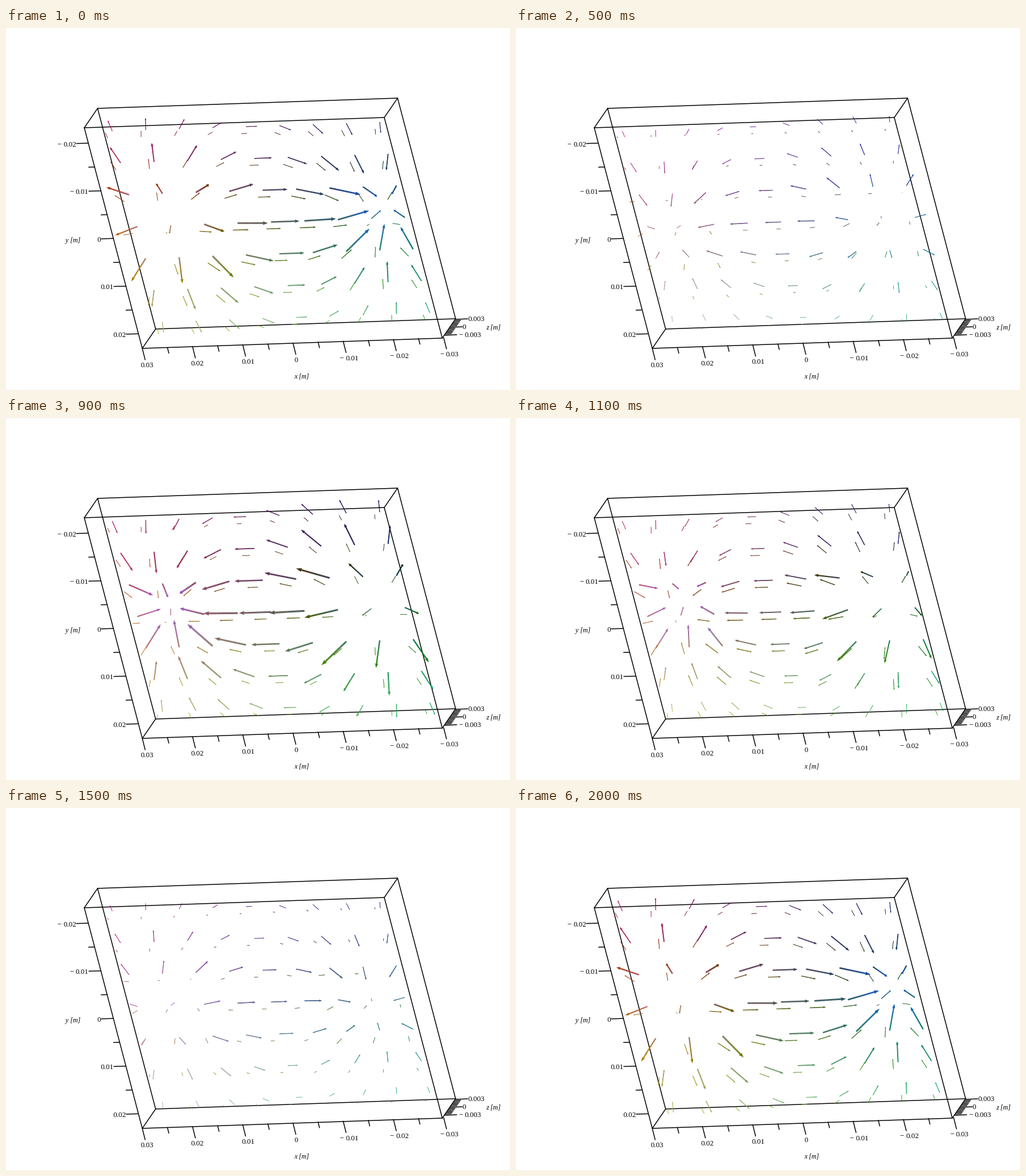
These frames come from a looping animation (882x635 px, 2.1 s). A matplotlib script:

```python
import numpy as np
import matplotlib.pyplot as plt
from matplotlib.animation import FuncAnimation
from matplotlib.collections import LineCollection, PolyCollection

W, H, DPI = 882, 635, 100
PX = 72 / DPI
STEPS = 20

# Screen directions of the three space axes
AXES = np.array([[1, -0.034], [0.25, 0.953], [-0.37, 0.555]])
ORIGIN = np.array([186, 181])
STEP, GAP = 58.5, 22
COLS, ROWS = 9, 7

fig = plt.figure(figsize=(W / DPI, H / DPI), dpi=DPI, facecolor="white")
ax = fig.add_axes([0, 0, 1, 1])
ax.set_xlim(0, W)
ax.set_ylim(H, 0)
ax.axis("off")


def line(p, q):
    ax.plot([p[0], q[0]], [p[1], q[1]], color="black", lw=1.5 * PX,
            solid_capstyle="round", zorder=1)


def number(text, right, y):
    """Right-aligned number; the minus sign stands a little apart."""
    style = dict(family="Liberation Serif", fontsize=13 * PX,
                 ha="right", va="baseline")
    digits = text.lstrip("-")
    ax.text(right, y + 4.4, digits, **style)
    if text != digits:
        width = 13 * (0.5 * len(digits) - (0.25 if "." in digits else 0))
        ax.text(right - width - 3, y + 4.4, "\u2212", **style)


def axis_name(text, x, y):
    ax.text(x, y + 4, text, family="Liberation Serif", style="italic",
            fontsize=12 * PX, ha="center", va="baseline")


def draw_box():
    corner = np.array([137, 175])
    edges = np.array([[525, -18], [101.5, 387], [23.3, -34]])
    for n in range(3):
        a, b = np.delete(edges, n, axis=0)
        for start in (corner, corner + a, corner + b, corner + a + b):
            line(start, start + edges[n])


def draw_ticks():
    for n in range(9):
        x, y = 144.2 + 10.9 * n, 202 + 41.8 * n
        size = 10.5 if n % 2 else 21
        line((x, y), (x - size, y + 0.03 * size))
    for n, text in enumerate(["-0.02", "-0.01", "0", "0.01", "0.02"]):
        number(text, 123 + 21.7 * n, 203.5 + 83.5 * n)

    for n in range(13):
        x, y = 238.5 + 43.95 * n, 562 - 1.58 * n
        size = 0.5 if n % 2 else 1
        line((x, y), (x + 5 * size, y + 20 * size))
    rights = [258, 346, 435, 511, 617, 705, 792]
    names = ["0.03", "0.02", "0.01", "0", "-0.01", "-0.02", "-0.03"]
    for n, (text, right) in enumerate(zip(names, rights)):
        number(text, right, 591 - 3.2 * n)

    for n in range(13):
        x, y = 787 - 1.6 * n, 511 + 2.33 * n
        size = 10 if n % 6 else 21
        line((x, y), (x + size, y - 0.04 * size))
    number("0.003", 838, 510)
    number("0", 805, 524)
    number("-0.003", 832, 538)

    axis_name("x [m]", 517, 610)
    axis_name("y [m]", 117.5, 372)
    axis_name("z [m]", 852.5, 524)


def pole(cx, cy):
    """In-plane outflow and normal flow of one round electrode."""
    dx, dy = col - cx, row - cy
    r = np.hypot(dx, dy)
    pull = 280 / (r ** 3.4 + 9.07) ** 0.882
    return dx * pull, dy * pull, 1 / (1 + (r / 1.7) ** 12)


col, row, layer = (g.ravel() for g in np.meshgrid(
    np.arange(COLS), np.arange(ROWS), np.arange(2), indexing="ij"))
base = np.stack([col * STEP, row * STEP, layer * GAP], axis=1).astype(float)
mode = np.stack([a - b for a, b in zip(pole(1, 3), pole(7, 3))], axis=1)

# Cosine and sine parts per layer: deeper means weaker and later
PLANE = np.array([[0.95, -0.546], [0.49, 0.16]])
NORMAL = np.array([[26, 9], [4, 10]])

SAMPLES = np.linspace(0, 1, 8)


def flow(theta):
    wave = np.array([np.cos(theta), np.sin(theta)])
    plane, normal = (PLANE @ wave)[layer], (NORMAL @ wave)[layer]
    return mode * np.stack([plane, plane, normal], axis=1)


def shade(points):
    """Colour by position within the bounds of all arrows."""
    lo, hi = points.min(axis=(0, 1)), points.max(axis=(0, 1))
    rgb = (points - lo) / (hi - lo)
    rgb[..., 0] = 1 - rgb[..., 0]
    rgb[..., 2] = 1 - rgb[..., 2]
    return rgb


draw_box()
draw_ticks()
shafts = LineCollection([], capstyle="butt", zorder=2)
lights = LineCollection([], capstyle="butt", zorder=3)
heads = PolyCollection([], linewidths=0, zorder=4)
for item in (shafts, lights, heads):
    ax.add_collection(item, autolim=False)


def update(k):
    vec = flow(2 * np.pi * k / STEPS)
    length = np.linalg.norm(vec, axis=1)
    points = base[:, None] + SAMPLES[None, :, None] * vec[:, None]
    rgb = shade(points)

    tail = ORIGIN + base @ AXES
    shift = vec @ AXES
    neck = 0.84
    path = tail[:, None] + SAMPLES[None, :, None] * neck * shift[:, None]
    segs = np.stack([path[:, :-1], path[:, 1:]], axis=2).reshape(-1, 2, 2)
    tint = ((rgb[:, :-1] + rgb[:, 1:]) / 2).reshape(-1, 3)
    width = np.maximum(0.75, 0.05 * length)
    lw = np.repeat(width, len(SAMPLES) - 1) * PX

    shafts.set_segments(segs)
    shafts.set_color(tint * 0.55)
    shafts.set_linewidth(lw)
    lights.set_segments(segs)
    lights.set_color(tint * 0.9)
    lights.set_linewidth(lw * 0.45)

    size = np.hypot(*shift.T)[:, None] + 1e-9
    side = np.stack([-shift[:, 1], shift[:, 0]], axis=1) / size
    side *= 0.058 * length[:, None]
    root, tip = tail + neck * shift, tail + shift
    heads.set_verts(np.stack([root + side, tip, root - side], axis=1))
    heads.set_facecolor(rgb[:, -1] * 0.7)
    return shafts, lights, heads


anim = FuncAnimation(fig, update, frames=STEPS + 1, interval=100,
                     repeat=True, repeat_delay=0, blit=False)
plt.show()
```
